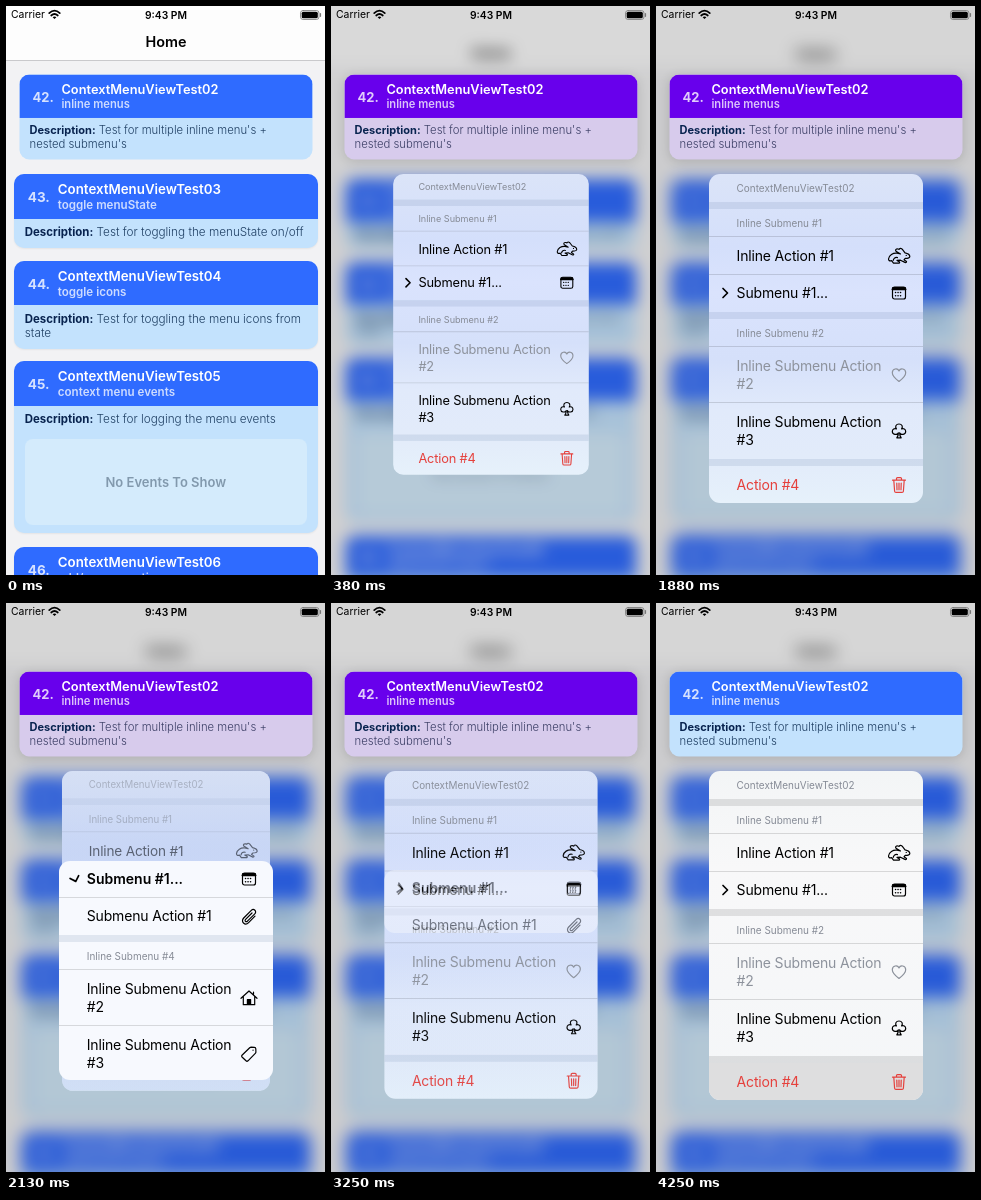
An HTML page for the animation above (4380 ms loop, 319 by 569 pixels).

```html
<!DOCTYPE html>
<html lang="en">
<head>
<meta charset="utf-8">
<title>Context menu</title>
<style>
  html, body { margin: 0; width: 100%; height: 100%; overflow: hidden; background: #f2f2f4; }
  #stage { position: relative; width: 319px; height: 569px; overflow: hidden; font-family: Inter, sans-serif; color: #000; }
  #stage div, #stage svg { box-sizing: border-box; position: absolute; white-space: nowrap; }
  svg { fill: none; stroke: currentColor; stroke-width: 1.2; stroke-linecap: round; stroke-linejoin: round; overflow: visible; }

  #home { inset: 0; background: #f2f2f4; box-shadow: 0 0 0 100px #f2f2f4; transform-origin: 160px 284px; }
  #nav { left: -90px; right: -90px; top: -90px; height: 145px; background: #fdfdfd; border-bottom: 1px solid #c9c9cc; }
  #title { width: 320px; top: 27px; font: 600 14.4px/18px Inter, sans-serif; text-align: center; }
  #status { inset: 0; font-size: 10.4px; line-height: 14px; }

  .card { left: 8.3px; width: 303.6px; border-radius: 10px; overflow: hidden; background: #c3e2fd; box-shadow: 0 1px 2px #0000000f; }
  .card .head { width: 100%; height: 44.5px; background: #2f6bff; color: #fff; }
  .card .num { left: 13.5px; top: 14px; font: 700 13.5px/18px Inter, sans-serif; opacity: .8; }
  .card .name { left: 43.5px; top: 7.2px; font: 600 13.3px/16px Inter, sans-serif; }
  .card .sub { left: 43.5px; top: 23px; font: 600 11.6px/16px Inter, sans-serif; opacity: .76; }
  .card .desc { left: 10.5px; top: 51.2px; font: 300 11.75px/14px Inter, sans-serif; color: #1f3f63; }
  .card .desc b { font-weight: 700; font-size: 11.45px; color: #08234f; }
  .card .empty { left: 10.5px; top: 77.5px; width: 282px; height: 86px; border-radius: 8px; background: #d4ebfc;
    color: #8299ad; font: 600 13px/86px Inter, sans-serif; text-align: center; }
  #lifted .card { transform: scale(.964); }
  #lifted.on .head { background: #6800ec; }
  #lifted.on .card { background: #d7cbec; }
  #lifted.on .desc { color: #3c3f66; }

  .menu { left: 53.2px; width: 213.6px; border-radius: 11px; overflow: hidden; transform-origin: 50% 0; }
  #main { top: 167.5px; height: 329px;
    background: linear-gradient(#dbe4f8, #d4dffb 22%, #dae3fd 36%, #d5e0fa 56%, #e1eafb 72%, #e2ebfa 86%, #e6f1fb); }
  #main.picked { background: linear-gradient(#f3f5f6, #f8f8f9 30%, #f4f6f8); }
  #panel { background: #f7f9fe; }
  #veil { inset: 0; background: linear-gradient(#d0dbf1, #b9cbef 26%); }
  .row { left: 0; width: 100%; border-bottom: .7px solid #0002; }
  .row.last { border: 0; }
  .label { left: 27.6px; font-size: 14px; line-height: 18.5px; letter-spacing: -.17px; }
  .caption .label { font-size: 9.95px; line-height: 12px; letter-spacing: 0; color: #868b96; }
  .gap { left: 0; width: 100%; height: 7px; background: #6078a026; }
  .off { color: #8d929c; }
  .red { color: #e5403c; }
  .bold .label { font-weight: 600; letter-spacing: 0; }
  .icon { left: 179.6px; width: 20px; height: 20px; }
  .chevron { left: 9px; width: 14px; height: 14px; }
  .picked .red { background: #dededf; }
  .picked .gap { background: #0000001a; }
</style>
</head>
<body>
<div id="stage">
  <div id="home"><div id="nav"></div><div id="title">Home</div></div>
  <div id="lifted"></div>
  <div id="main" class="menu"></div>
  <div id="panel" class="menu"></div>
  <div id="status">
    <div style="left:5px;top:2px">Carrier</div>
    <svg style="left:42px;top:3px" width="13" height="11" viewBox="0 0 13 11">
      <path d="M1.2 4.2Q6.5-.8 11.8 4.2M3.2 6.5Q6.5 3.5 9.8 6.5" style="stroke-width:1.7"/>
      <path d="M4.6 8.2Q6.5 6.6 8.4 8.2L6.5 10Z" fill="#000" stroke="none"/>
    </svg>
    <div style="width:320px;top:2px;text-align:center;font-weight:600;font-size:10.3px">9:43 PM</div>
    <svg style="left:294px;top:3.5px" width="22" height="10" viewBox="0 0 22 10">
      <rect x=".5" y=".5" width="18.5" height="9" rx="2.6" stroke="#777" style="stroke-width:.8"/>
      <rect x="1.7" y="1.7" width="16.1" height="6.6" rx="1.6" fill="#000" stroke="none"/>
      <path d="M20.5 3.7V6.3" stroke="#777"/>
    </svg>
  </div>
</div>
<script>
const $ = id => document.getElementById(id);

const icons = {
  hare: '<path d="M-.5 13C0 9 4 6.8 8 7.2L11.5 8L7 5.2C6 3.6 7.4 2.6 9 3L10.2 3.4C10.4 2 12 2 13.2 3.2L16 6.8C18.5 7.3 20.8 9 20.8 10.6C20.6 12 18.5 12.4 16.2 12.4L15 13.8L17.5 15.6Q17.6 16.6 16.4 16.6L11.5 14.2L8 14.4L10.6 16Q10.8 17.2 9.6 17.2H4.5L2.6 14.6Q-.5 15.4-.5 13Z"/><path d="M17.2 9.4h.1M4.2 14.4Q5 10.8 8.5 11.6"/>',
  calendar: '<rect x="3.5" y="4" width="13" height="12" rx="2"/><path d="M3.5 6.2h13M4 5h12" style="stroke-width:2"/><path d="M6.5 9.5h7.5M6.5 12.8h7.5" stroke-dasharray=".1 2.4" style="stroke-width:1.5"/>',
  heart: '<path d="M10 16.5C6 13.5 3.3 11 3.3 7.8C3.3 3.5 8.6 2.6 10 6C11.4 2.6 16.7 3.5 16.7 7.8C16.7 11 14 13.5 10 16.5Z"/>',
  club: '<path d="M9.4 11.8C8 14.5 3.3 13.6 3.3 10.6C3.3 8 5.6 7 7.4 7.9C5.6 5.2 7.3 3 10 3S14.4 5.2 12.6 7.9C14.4 7 16.7 8 16.7 10.6C16.7 13.6 12 14.5 10.6 11.8Q10.5 14.5 12.2 16.8H7.8Q9.5 14.5 9.4 11.8Z"/>',
  trash: '<path d="M3.5 5.2h13M7.5 5V3.6Q7.5 2.6 8.5 2.6h3Q12.5 2.6 12.5 3.6V5M4.8 5.2l.8 11Q5.7 17.4 7 17.4h6Q14.3 17.4 14.4 16.2l.8-11M7.8 8l.2 6.8M10 8v6.8M12.2 8l-.2 6.8"/>',
  clip: '<path d="M16 9.2L9.6 15.7C6 19.2 1.2 14.6 4.7 11L12.3 3.4C14.8 1 18.2 4.4 15.8 6.8L8.4 14.2C7 15.5 5.2 13.8 6.6 12.4L13 6"/>',
  house: '<path d="M2 10.3L10 3L18 10.3M4.3 8.5V16.7H15.7V8.5M14.5 4V6.8"/><path d="M8.4 16.5V11.5H11.6V16.5Z" fill="currentColor"/>',
  tag: '<path d="M3 11.2L10.7 3.8Q11.3 3.2 12.2 3.2L15.4 3.3Q16.7 3.4 16.8 4.7L16.9 8Q16.9 8.8 16.3 9.4L9 16.8Q8 17.7 7 16.8L3 13Q2.2 12.1 3 11.2Z"/><path d="M14 6.2h.1"/>',
  sun: '<path d="M6 11.3A4 4 0 0 1 14 11.3M1.8 11.5h16.4M4 14.2h12M6.3 16.8h7.4M10 3v1.8M4.5 5.3l1.2 1.2M15.5 5.3l-1.2 1.2M2 9h1.7M16.3 9H18"/>'
};
const svg = (cls, top, body, size = 20) =>
  `<svg class="${cls}" style="top:${top}px" viewBox="0 0 ${size} ${size}">${body}</svg>`;

function card(top, height, num, sub, desc, extra = '') {
  return `<div class="card" style="top:${top}px;height:${height}px"><div class="head">
    <div class="num">${num}.</div><div class="name">ContextMenuViewTest${String(num - 40).padStart(2, '0')}</div>
    <div class="sub">${sub}</div></div><div class="desc"><b>Description:</b> ${desc}</div>${extra}</div>`;
}

// Row kinds: caption, gap, or an action with optional icon and chevron.
const caption = text => ({ text, h: 28.2, cls: 'caption', line: 12 });
const gap = { gap: true, h: 7 };
const action = (text, icon, cls = '', chevron = '') =>
  ({ text, icon, cls, chevron, h: text.includes('<br>') ? 56 : 37.3, line: 18.5 });

function menu(rows) {
  let y = 0;
  return rows.map((r, i) => {
    const top = y;
    y += r.h;
    if (r.gap) return `<div class="gap" style="top:${top}px"></div>`;
    const lines = r.text.split('<br>').length;
    const last = !rows[i + 1] || rows[i + 1].gap ? 'last' : '';
    return `<div class="row ${r.cls} ${last}" style="top:${top}px;height:${r.h}px">
      <div class="label" style="top:${(r.h - lines * r.line) / 2}px">${r.text}</div>
      ${r.icon ? svg('icon', r.h / 2 - 10, icons[r.icon]) : ''}
      ${r.chevron ? svg('chevron', r.h / 2 - 7, `<path d="M5 2.5L9.5 7L5 11.5" style="stroke-width:1.7" ${r.chevron}/>`, 14) : ''}</div>`;
  }).join('');
}

$('home').innerHTML +=
  card(168, 73.7, 43, 'toggle menuState', 'Test for toggling the menuState on/off') +
  card(254.6, 88, 44, 'toggle icons', 'Test for toggling the menu icons from<br>state') +
  card(355.3, 172, 45, 'context menu events', 'Test for logging the menu events', '<div class="empty">No Events To Show</div>') +
  card(540.6, 88, 46, 'add/remove action', 'Test for changing the menu');
$('lifted').innerHTML = card(67, 88, 42, 'inline menus', "Test for multiple inline menu's +<br>nested submenu's");

$('main').innerHTML = menu([
  caption('ContextMenuViewTest02'), gap,
  caption('Inline Submenu #1'), action('Inline Action #1', 'hare'),
  action('Submenu #1...', 'calendar', '', ' '), gap,
  caption('Inline Submenu #2'), action('Inline Submenu Action<br>#2', 'heart', 'off'),
  action('Inline Submenu Action<br>#3', 'club'), gap,
  action('Action #4', 'trash', 'red')
]) + '<div id="veil"></div>';
$('panel').innerHTML = menu([
  action('Submenu #1...', 'calendar', 'bold', 'id="arrow"'),
  action('Submenu Action #1', 'clip'), gap,
  caption('Inline Submenu #4'), action('Inline Submenu Action<br>#2', 'house'),
  action('Inline Submenu Action<br>#3', 'tag'), gap,
  action('Submenu Action #4', 'sun')
]);

const LOOP = 4380, STEP = 125, LAST = 34;
const MENU_OPENS = 120, SUBMENU_OPENS = 1875, SUBMENU_CLOSES = 2940, ACTION_PICKED = 4250;

// Critically damped spring from 0 to 1; rate is per second.
function spring(ms, rate) {
  const x = Math.max(0, ms) / 1000 * rate;
  return 1 - (1 + x) * Math.exp(-x);
}
const mix = (a, b, p) => a + (b - a) * p;

function render(t) {
  const shown = spring(t - MENU_OPENS, 16);
  const open = spring(t - SUBMENU_OPENS, 12) - spring(t - SUBMENU_CLOSES, 12);
  const picked = t >= ACTION_PICKED;
  const home = $('home').style, main = $('main').style, panel = $('panel').style;

  home.filter = shown ? `blur(${9 * shown}px) brightness(${1 - .155 * shown})` : 'none';
  home.transform = `scale(${1 - .048 * shown})`;
  $('lifted').className = shown > .1 && !picked ? 'on' : '';
  $('lifted').firstChild.style.boxShadow = `0 2px 12px rgba(0,0,0,${.16 * shown})`;

  main.opacity = Math.min(1, shown * 1.2);
  main.transform = `scale(${shown * (1 - .035 * open)})`;
  $('main').classList.toggle('picked', picked);
  $('veil').style.opacity = .6 * open;

  panel.opacity = Math.min(1, open * 4);
  panel.top = mix(268.2, 255, open) + 'px';
  panel.height = mix(37.3, 265, open) + 'px';
  $('arrow').setAttribute('transform', `rotate(${90 * open} 7 7)`);
}

// The picture advances eight times a second.
const began = performance.now();
function tick() {
  const t = (performance.now() - began) % LOOP;
  render(Math.min(LAST, Math.floor(t / STEP)) * STEP);
  requestAnimationFrame(tick);
}
tick();
</script>
</body>
</html>
```
